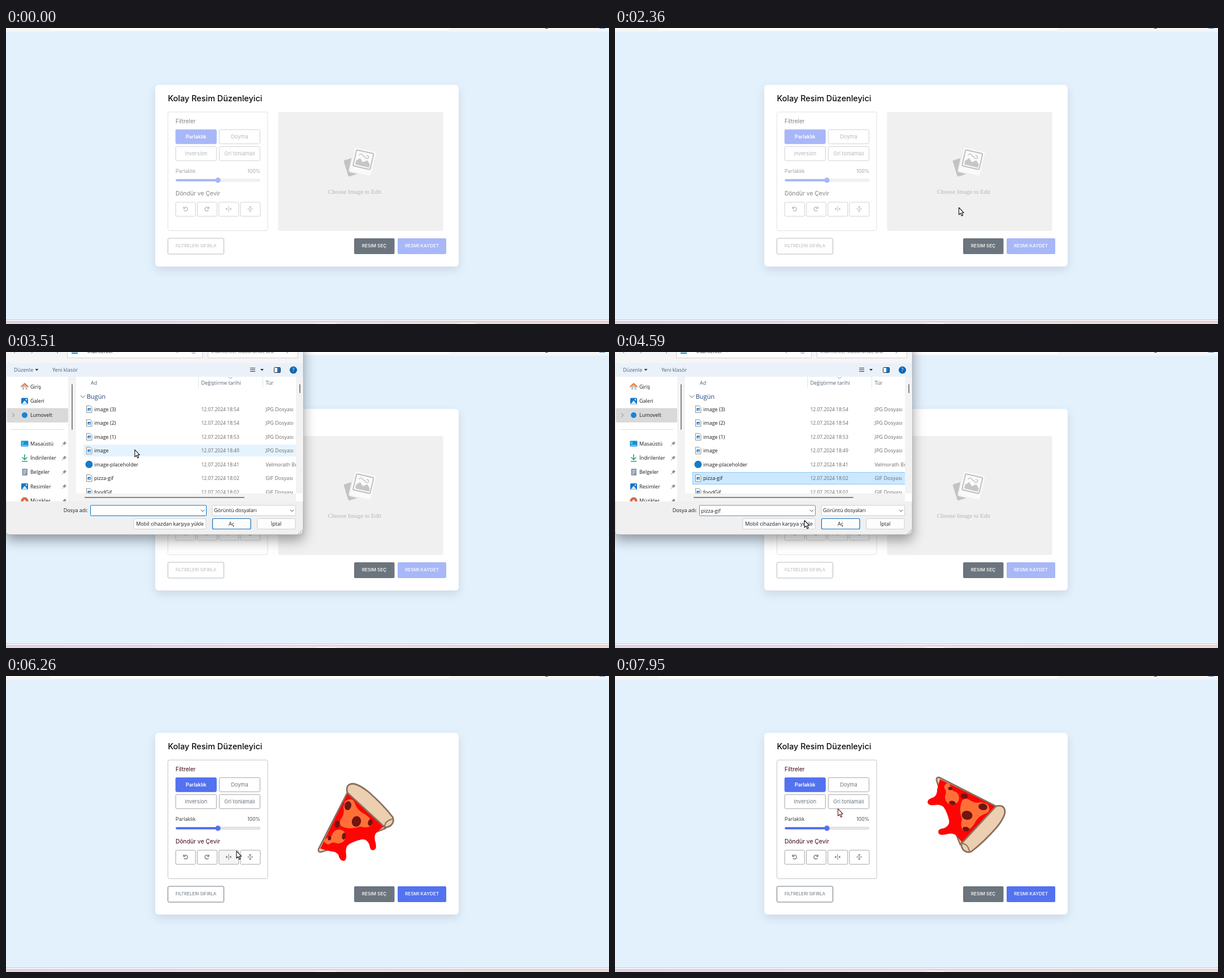
These frames come from a looping animation (1067 px wide and 525 px high, 8000 ms). An HTML page:

```html
<!DOCTYPE html>
<html lang="tr">
<head>
<meta charset="utf-8">
<title>Kolay Resim Düzenleyici</title>
<style>
  html, body { margin: 0; width: 100%; height: 100%; overflow: hidden; background: #e3f1fd; }
  svg { display: block; }
  text { font-family: Inter, sans-serif; white-space: pre; }
  #dialog text { font-family: "Open Sans", sans-serif; font-size: 9px; fill: #1b1b1b; }
  #dialog .soft { fill: #6b6b6b; }
  #dialog .date { fill: #6b6b6b; font-size: 8.5px; }
  #dialog .head { fill: #4c607a; }
  .mid { text-anchor: middle; }
  .line { fill: none; stroke-linecap: round; stroke-linejoin: round; }
  #card { filter: drop-shadow(0 6px 8px rgba(0, 0, 0, .1)); }
  #frame { filter: drop-shadow(0 9px 11px rgba(0, 0, 0, .38)); }
</style>
</head>
<body>
<svg width="1067" height="525" viewBox="0 0 1067 525">
  <defs>
    <linearGradient id="taskbar">
      <stop offset="0" stop-color="#e6d3ea"/>
      <stop offset=".2" stop-color="#ecd3ee"/>
      <stop offset=".5" stop-color="#f2e0ea"/>
      <stop offset=".8" stop-color="#eed8dc"/>
      <stop offset="1" stop-color="#f0d8d6"/>
    </linearGradient>
    <clipPath id="listClip"><path d="M123 44H513V251H123Z"/></clipPath>
    <clipPath id="sideClip"><path d="M0 44H123V265H0Z"/></clipPath>
  </defs>

  <!-- browser window -->
  <rect width="1067" height="525" fill="#e3f1fd"/>
  <rect width="1067" height="6.5" fill="#f6f6f5"/>
  <path d="M74-2Q76 4 84 4H776Q785 4 787-2Z" fill="#fff"/>
  <path d="M954 0Q957 1.5 959 0" stroke="#223" fill="none"/>
  <path d="M1050 0H1060" stroke="#4a7fe0" stroke-width="2"/>
  <rect y="517" width="1067" height="1" fill="#c9ced4"/>
  <rect y="518" width="1067" height="2.5" fill="#f7f7fa"/>
  <rect y="520.5" width="1067" height="5" fill="url(#taskbar)"/>
  <rect y="520" width="1067" height="1" fill="#cdb9c8"/>
  <ellipse cx="567" cy="525" rx="18" ry="2" fill="#faf2f6"/>
  <ellipse id="glow" cx="815" cy="525" rx="18" ry="2" fill="#fbf3f3"/>

  <!-- editor -->
  <rect id="card" x="264" y="101" width="537" height="322" rx="6" fill="#fff"/>
  <text x="286.5" y="130.4" font-size="14.4" font-weight="500" fill="#08080f">Kolay Resim Düzenleyici</text>
  <g id="panel"></g>
  <g id="reset">
    <rect x="286.5" y="373" width="99" height="28" rx="2" fill="none" stroke="#6c757d"/>
    <text class="mid" x="336" y="389.2" font-size="7.8" fill="#6c757d">FILTRELERI SIFIRLA</text>
  </g>
  <rect x="616" y="373" width="71.500" height="28" rx="2" fill="#6c757d"/>
  <text class="mid" x="651.5" y="389.300" font-size="8.2" font-weight="500" fill="#fff">RESIM SEÇ</text>
  <g id="save">
    <rect x="693" y="373" width="86" height="28" rx="2" fill="#5372f0"/>
    <text class="mid" x="736" y="389.3" font-size="8.2" font-weight="500" fill="#fff">RESMI KAYDET</text>
  </g>

  <g id="placeholder">
    <rect x="481.500" y="149" width="292" height="211" rx="3" fill="#f0f0f0"/>
    <rect x="-15" y="-15" width="30" height="30" rx="2" transform="translate(616 245) rotate(-17)" fill="#c3c3c3"/>
    <g transform="translate(631.5 237) rotate(13)">
      <rect x="-20" y="-22.500" width="40" height="45" rx="3" fill="#fafafa" stroke="#f0f0f0" stroke-width="2"/>
      <rect x="-15.500" y="-18" width="31" height="29" rx="2" fill="#fafafa" stroke="#bfbfbf" stroke-width="2"/>
      <path d="M-12 8V1L-6-5L0 1L7-4L13 2V8Z" fill="#c6c6c6"/>
      <path class="line" d="M-9-10Q-5-15-2-10L2-9M4-12Q9-13 8-8Q3-5 2-9" stroke="#c6c6c6" stroke-width="1.600"/>
    </g>
    <text class="mid" x="617" y="293.500" style="font-family:'Liberation Serif',serif" font-size="10.85" fill="#b4b4b4">Choose Image to Edit</text>
  </g>

  <g id="pizza">
    <g class="line" stroke="#8a705f" stroke-width="2.600">
      <path d="M604 207L553 307Q552 313 558 312L602 298L672 270L660 262Z" style="fill:#ebcfb0"/>
    </g>
    <path d="M604 208L668 267L656 277Q650 283 654 296Q657 309 649 309Q644 309 643 299Q638 288 629 290Q614 293 605 300Q600 305 602 317Q603 327 597 328Q591 328 588 317Q584 311 575 311Q562 308 556 306Z" fill="#fe0505"/>
    <g fill="#ff7038">
      <path d="M600 222Q613 214 617 225Q621 238 633 244Q648 252 647 265Q639 271 627 267Q611 273 597 268Q588 265 592 255Q600 244 597 233Z"/>
      <path d="M562 292Q569 285 577 283Q578 273 590 272Q602 274 601 286Q598 298 586 297Q577 293 573 298Q566 300 562 292Z"/>
    </g>
    <g id="toppings" fill="#701512"></g>
    <path class="line" d="M604 207L553 307" stroke="#8a705f" stroke-width="2.400"/>
    <path d="M604 207Q600 191 615 191Q626 193 642 206Q668 229 684 250Q688 258 681 265Q674 270 669 267Z" fill="#ebcfb0" stroke="#8a705f" stroke-width="2.800" stroke-linejoin="round"/>
    <path class="line" d="M670 266Q671 257 683 254" stroke="#8a705f" stroke-width="2"/>
  </g>

  <!-- file dialog -->
  <g id="dialog">
    <rect id="frame" x="0" y="-130" width="526" height="454" rx="5" fill="#f0f0f0" stroke="#9aa0a6" stroke-width=".8"/>
    <rect y="-20" width="525.500" height="40" fill="#f4f5f7"/>
    <path d="M108.500-5V10.500H347.500V-5M357.500-5V10.500H516.500V-5" fill="#fff" stroke="#d2d2d2"/>
    <path class="line" d="M14 0l2 2M45 2l2-2M91-1v3M196-1l2 1M301-1l2 2l2-2M329 1q3 3 6 0M497 2l3-3" stroke="#777"/>
    <path d="M116 2H127" stroke="#1b86d1" stroke-width="2"/>
    <text x="144" y="1.500">İndirilenler</text>
    <text class="soft" x="363" y="1.500">İndirilenler klasöründe ara</text>
    <rect y="20" width="525.500" height="24" fill="#eaf1f9"/>
    <text class="head" x="14" y="35">Düzenle</text>
    <text class="head" x="82" y="35">Yeni klasör</text>
    <path d="M51.500 30h6l-3 3.500zM450 30h6l-3 3.500z" fill="#333"/>
    <path d="M432 28.500h9M432 31.500h9M432 34.500h9" stroke="#333"/>
    <rect x="474.500" y="27.500" width="11" height="9" rx="1" fill="#fff" stroke="#223"/>
    <rect x="480" y="28" width="5" height="8" fill="#1577c9"/>
    <circle cx="508.500" cy="32" r="6.500" fill="#0a67b5"/>
    <text class="mid" x="508.500" y="35.300" style="fill:#fff">?</text>
    <rect x=".5" y="44" width="525" height="221" fill="#fff"/>
    <rect x="110" y="44" width="14" height="221" fill="#f3f3f3"/>
    <rect x="513" y="44" width="12.500" height="207" fill="#f3f3f3"/>
    <rect x="124" y="251" width="389" height="14" fill="#f3f3f3"/>
    <path class="line" d="M117 58V137M520 58V72M140 258H421" stroke="#858585" stroke-width="2"/>
    <path d="M340.500 44V64M454.500 44V64" stroke="#e4e4e4"/>
    <path class="line" d="M394 45l3 2l3-2" stroke="#999"/>
    <text class="head" x="150" y="57.500">Ad</text>
    <text class="head" x="345.500" y="57.500">Değiştirme tarihi</text>
    <text class="head" x="459.500" y="57.500">Tür</text>
    <g id="sidebar" clip-path="url(#sideClip)"></g>
    <g clip-path="url(#listClip)">
      <rect id="hover" x="137" width="377" height="21" fill="#e5f3ff"/>
      <rect id="selected" x="137.500" y="213.500" width="378" height="21"/>
      <path class="line" d="M132 77l4 4l4-4" stroke="#667"/>
      <text x="143" y="82.500" style="font-size:10.900px;fill:#1f3f77">Bugün</text>
      <g id="files"></g>
    </g>
    <text x="145" y="284" text-anchor="end">Dosya adı:</text>
    <rect id="field" x="149.500" y="272" width="205" height="18.500" rx="1" fill="#fff"/>
    <rect id="marked" x="152" y="274.500" width="37.500" height="13" fill="#0078d4"/>
    <text id="fileName" x="152.500" y="284.500">pizza-gif</text>
    <rect x="365" y="272" width="147.500" height="18" rx="1" fill="#fff" stroke="#d0d0d0"/>
    <text x="368" y="284">Görüntü dosyaları</text>
    <path class="line" d="M345 280l3 3l3-3M503 280l3 3l3-3" stroke="#555"/>
    <g fill="#fdfdfd" stroke="#d0d0d0">
      <rect x="226" y="295.500" width="128" height="18.500" rx="2"/>
      <rect x="444.500" y="295.500" width="67.500" height="18.500" rx="2"/>
      <rect id="open" x="365.500" y="295.500" width="67.500" height="18.500" rx="2" stroke="#0f6cbd" stroke-width="1.200"/>
    </g>
    <text class="mid" x="290" y="308">Mobil cihazdan karşıya yükle</text>
    <text class="mid" x="399" y="308">Aç</text>
    <text class="mid" x="478" y="308">İptal</text>
    <path d="M517 322h2m1 0h2m1 0h2M520 319h2m1 0h2M523 316h2" stroke="#aaa" stroke-width="1.500"/>
  </g>

  <path id="cursor" d="M.5 .5V13.200L3.400 10.500L5.500 15.200L7.600 14.200L5.500 9.700H9.200Z" fill="#fff" stroke-width="1.100" stroke-linejoin="round"/>
</svg>

<script>
const LOOP = 8000;
const CLICK_FILE = 4190, CLICK_OPEN = 5200, IMAGE_READY = 5640;
const $ = id => document.getElementById(id);
const set = (id, attrs) => { for (const k in attrs) $(id).setAttribute(k, attrs[k]); };
const show = (id, on) => { $(id).style.display = on ? '' : 'none'; };
const clamp = v => Math.min(1, Math.max(0, v));
const ramp = (t, from, to) => clamp((t - from) / (to - from));

function buildPanel() {
  const label = (x, y, size, text, extra = 'fill="#444"') => `<text x="${x}" y="${y}" font-size="${size}" ${extra}>${text}</text>`;
  const box = (x, y, w, extra = '') => `<rect x="${x}" y="${y}" width="${w}" height="25" rx="2" fill="none" stroke="#a5a5a5" ${extra}/>`;
  const option = (x, y, text, active) =>
    box(x, y, 72, active ? 'style="fill:#5372f0;stroke:#5372f0"' : '') +
    label(x + 36, y + 15.4, active ? 8.9 : 9.2, text, `class="mid" ${active ? 'fill="#fff" font-weight="600"' : 'fill="#6c757d"'}`);
  const undo = 'M-3.300-3.800V-.900H-.400M-3-1.200A3.500 3.500 0 1 1-2.300 2.500';
  const arrows = 'M-4.500-2.300L-1.500 0L-4.500 2.300ZM4.500-2.300L1.500 0L4.500 2.300Z';
  const dashes = 'M0-4.500V-2M0-1V1M0 2V4.500';
  const icons = [
    `<path class="line" d="${undo}"/>`,
    `<path class="line" d="${undo}" transform="scale(-1 1)"/>`,
    `<path d="${arrows}" fill="#6c757d" stroke="none"/><path d="${dashes}"/>`,
    `<g transform="rotate(90)"><path d="${arrows}" fill="#6c757d" stroke="none"/><path d="${dashes}"/></g>`
  ];
  $('panel').innerHTML =
    '<rect x="286.500" y="149" width="176.500" height="210.500" rx="3" fill="none" stroke="#c4c4c4"/>' +
    label(300, 168.8, 10, 'Filtreler', 'class="title"') +
    option(300.3, 180.3, 'Parlaklık', true) + option(377.4, 180.3, 'Doyma') +
    option(300.3, 210.3, 'Inversion') + option(377.4, 210.3, 'Gri tonlamalı') +
    label(300, 257.3, 8.95, 'Parlaklık') + label(450, 257.3, 8.6, '100%', 'text-anchor="end" fill="#54444a"') +
    '<rect x="300.500" y="268.300" width="149" height="3.400" rx="1.700" fill="#efefef" stroke="#b2b2b2" stroke-width=".7"/>' +
    '<rect x="300.500" y="268" width="75" height="4" rx="2" fill="#5372f0"/><circle cx="375" cy="270" r="4.700" fill="#5372f0"/>' +
    label(300, 296.8, 10.3, 'Döndür ve Çevir', 'class="title"') +
    icons.map((icon, i) => box(300.3 + i * 38.2, 309, 35, `id="turn${i}"`) +
      `<g transform="translate(${317.5 + i * 38.2} 321)" stroke="#6c757d" stroke-width="1.300" fill="none">${icon}</g>`).join('');
}

function buildDialog() {
  const files = [
    ['image (3)', '18:54', 'JPG'], ['image (2)', '18:54', 'JPG'], ['image (1)', '18:53', 'JPG'], ['image', '18:49', 'JPG'],
    ['image-placeholder', '18:41', ''], ['pizza-gif', '18:02', 'GIF'], ['foodGif', '18:02', 'GIF']
  ];
  const page = `<path d="M-4.500-6H2L5-3V6H-4.500Z" fill="#fff" stroke="#8d8d8d"/><rect x="-2.500" y="-2" width="5.500" height="5" fill="#2b7cc7"/><path d="M-2 2.500L1-.500L3 2" fill="#bfe3f5"/>`;
  $('files').innerHTML = files.map(([name, time, kind], i) => {
    const y = 101.5 + i * 24.45;
    const icon = kind ? page : '<circle r="6.500" fill="#1a79c4"/>';
    return `<g transform="translate(147 ${y})">${icon}</g><text x="156" y="${y + 3.3}">${name}</text>` +
      `<text class="date" x="345.500" y="${y + 3.3}">12.07.2024 ${time}</text>` +
      `<text class="soft" x="459.500" y="${y + 3.3}">${kind ? kind + ' Dosyası' : 'Velmorath Br'}</text>`;
  }).join('');

  const picture = '<rect x="-6" y="-5.500" width="12" height="11" rx="1.500" fill="#1675c5"/><path d="M-5 5L0-1L5 5Z" fill="#d5f0ff"/><circle cx="3" cy="-2.500" r="1.200" fill="#fff"/>';
  const places = [
    ['Giriş', 61.5, '<path d="M-4-1V5.500H-1V1H1.500V5.500H4.500V-1L0-5Z" fill="#c9c2bd"/><path class="line" d="M-6 0L0-5.500L6 0" stroke="#d9793c" stroke-width="1.800"/>'],
    ['Galeri', 87, picture],
    ['Lumovelt', 112, '<circle r="5" fill="#1683d8"/>'],
    ['Masaüstü', 162.5, '<rect x="-6.500" y="-5" width="13" height="10" rx="1" fill="#1492d4"/><path d="M-5-2.500h3M-5 0h3M-5 3h10" stroke="#bdeaff"/>'],
    ['İndirilenler', 188, '<path class="line" d="M0-6V2.500M-4-1L0 3L4-1M-4.500 6H4.500" stroke="#23a184" stroke-width="1.600"/>'],
    ['Belgeler', 213, '<rect x="-4.500" y="-6" width="9.500" height="12" rx="1" fill="#8797ab"/><path d="M-2.500-3H3M-2.500 0H3M-2.500 3H1" stroke="#fff"/>'],
    ['Resimler', 238.5, picture],
    ['Müzikler', 264, '<circle r="6.500" fill="#d56a4c"/><circle r="2" fill="#fff"/>']
  ];
  const pin = '<path d="M1-4L4-1L1.500 1L1 3L-3-1L-1-1.500Z" fill="#8c939c"/><path d="M-1 1L-4 4" stroke="#8c939c"/>';
  $('sidebar').innerHTML =
    '<rect x="1.500" y="99.500" width="108.500" height="25.500" rx="2" fill="#d9d9d9"/><path class="line" d="M11.500 109l3 3l-3 3" stroke="#777"/>' +
    '<path d="M8 137.500H103" stroke="#ddd"/>' +
    places.map(([name, y, icon], i) => `<g transform="translate(33 ${y})">${icon}</g><text x="43" y="${y + 3.3}">${name}</text>` +
      (i > 2 ? `<g transform="translate(103 ${y})">${pin}</g>` : '')).join('');
}

$('toppings').innerHTML = [[605, 230, 6, 8], [620, 258, 8, 9.5], [586, 263, 4.5, 6.5], [644.5, 260, 4, 6], [598, 284, 3.5, 6], [572.5, 287.5, 3, 4]]
  .map(([x, y, rx, ry]) => `<ellipse cx="${x}" cy="${y}" rx="${rx}" ry="${ry}" transform="rotate(12 ${x} ${y})"/>`).join('');

buildPanel();
buildDialog();

// time, x, y of the pointer tip
const pointerPath = [
  [70, 1004, 530], [240, 900, 450], [430, 766, 360], [690, 655, 300], [840, 660, 310],
  [1050, 676, 375], [1300, 645, 388], [1610, 475, 285], [1700, 465, 280], [2100, 580, 314], [2280, 608, 318],
  [2500, 608, 318], [2700, 634, 367], [2950, 470, 300], [3310, 250, 190], [3510, 227.5, 173],
  [3700, 205, 145], [3950, 195, 262], [4100, 190, 223], [4220, 190, 223],
  [4590, 334.5, 298], [4900, 402, 322], [5060, 412, 312], [5200, 414, 311], [5430, 414, 311],
  [5700, 783, 196], [5840, 747, 209], [5910, 703, 214], [5980, 511, 254], [6050, 456, 272], [6130, 422, 294],
  [6260, 407.5, 310], [6900, 352, 327], [7100, 322, 318], [7820, 320, 317], [7950, 394, 235]
];

function pointerAt(t) {
  const next = pointerPath.findIndex(key => key[0] > t);
  if (next === 0) return pointerPath[0].slice(1);
  if (next < 0) return pointerPath.at(-1).slice(1);
  const [t0, x0, y0] = pointerPath[next - 1], [t1, x1, y1] = pointerPath[next];
  const k = (t - t0) / (t1 - t0);
  return [x0 + (x1 - x0) * k, y0 + (y1 - y0) * k];
}

function drawDialog(t, x, y) {
  const opening = ramp(t, 2400, 2560), closing = ramp(t, 5390, 5550);
  const visible = opening > 0 && closing < 1;
  show('dialog', visible);
  if (!visible) return;
  const scale = 1 - .06 * (1 - opening) - .05 * closing;
  set('dialog', { opacity: opening * (1 - closing * .85), transform: `translate(263 97) scale(${scale}) translate(-263 -97)` });

  const picked = t >= CLICK_FILE, confirmed = t >= CLICK_OPEN;
  const row = Math.floor((y - 89.3) / 24.45);
  show('hover', x > 137 && x < 513 && row >= 0 && y < 251 && !(picked && row === 5));
  set('hover', { y: 91 + row * 24.45 });
  show('selected', picked);
  set('selected', confirmed ? { fill: '#d9d9d9', stroke: '#d9d9d9' } : { fill: '#cce8ff', stroke: '#8cc8f5' });
  show('fileName', picked);
  show('marked', confirmed);
  $('fileName').style.fill = confirmed ? '#fff' : '';
  set('field', { stroke: picked ? '#6793b8' : '#0078d4' });
  set('open', { fill: x > 365 && x < 433 && y > 295 && y < 314 ? '#cce4f7' : '#fdfdfd' });
}

function drawEditor(t, x, y) {
  const ready = t >= IMAGE_READY;
  for (const id of ['panel', 'reset', 'save']) set(id, { opacity: ready ? 1 : .5 });
  document.querySelectorAll('.title').forEach(el => el.setAttribute('fill', ready ? '#3c0512' : '#08080f'));
  show('placeholder', !ready);
  show('pizza', ready);
  const turns = [7150, 7500, 7850].filter(click => t >= click).length;
  set('pizza', { transform: `rotate(${-90 * turns} 627 254)` });
  for (let i = 0; i < 4; i++) {
    const left = 300.3 + i * 38.2;
    const over = ready && x >= left && x <= left + 35 && y >= 309 && y <= 334;
    set('turn' + i, { fill: over ? '#f5f5f5' : 'none' });
  }
}

function draw(now) {
  const t = now % LOOP;
  const [x, y] = pointerAt(t);
  drawEditor(t, x, y);
  drawDialog(t, x, y);
  show('glow', t < 500);
  set('cursor', { transform: `translate(${x} ${y})`, stroke: t > 7880 ? '#701a1a' : '#111' });
}

function frame() {
  draw(performance.now());
  requestAnimationFrame(frame);
}
frame();
</script>
</body>
</html>
```
